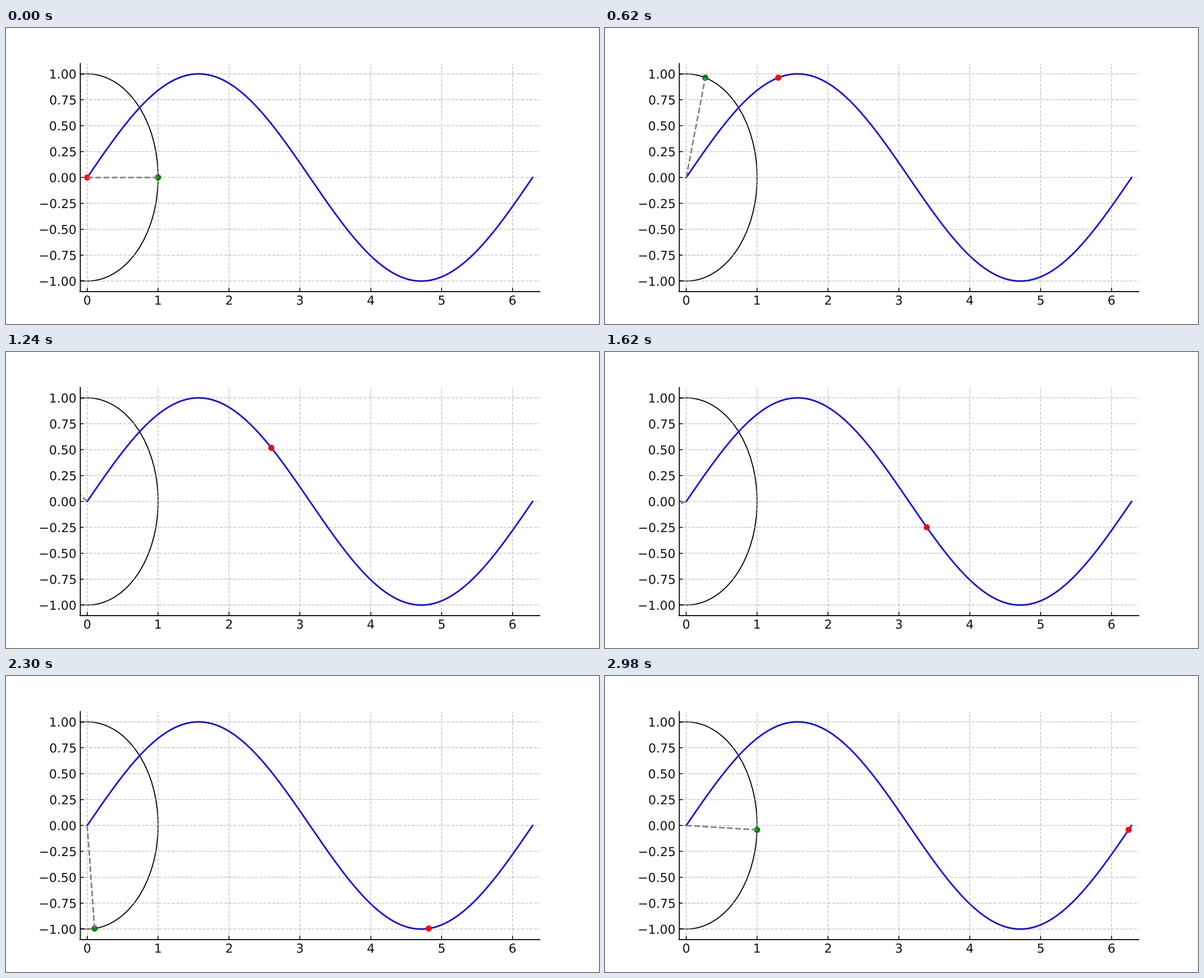
Write a matplotlib script that moves like this. It is 1058 by 529 pixels and loops after 3000 ms.

```python
import numpy as np
import matplotlib.pyplot as plt
from matplotlib.animation import FuncAnimation
from matplotlib.patches import PathPatch
from matplotlib.textpath import TextPath
from matplotlib.transforms import Affine2D

FRAMES = 150
INTERVAL = 20
TAU = 2 * np.pi
DPI = 132.25
PT = DPI / 72          # pixels in one point
W, H = 1058, 529
EM = 12 * PT           # label size in pixels

# Soft, unsnapped edges keep lines at their exact fractional positions
plt.rcParams["path.snap"] = False
plt.rcParams["font.family"] = "DejaVu Sans"

fig, ax = plt.subplots(figsize=(W / DPI, H / DPI), dpi=DPI)
ax.set_xlim(-0.1, TAU + 0.1)
ax.set_ylim(-1.1, 1.1)
ax.spines[["top", "right"]].set_visible(False)
ax.spines[["left", "bottom"]].set_linewidth(1)
ax.spines.left.set_position(("outward", -0.18))
ax.spines.bottom.set_position(("outward", 0.18))

xticks = np.arange(7)
yticks = np.linspace(-1, 1, 9)
ax.set_xticks(xticks)
ax.set_yticks(yticks)
ax.tick_params(length=0, labelleft=False, labelbottom=False)
ax.grid(True, linestyle="--", linewidth=0.8, color="#b0b0b0", alpha=0.7)

# Inward tick marks, 3.5 points long
box = ax.get_window_extent()
mark = dict(color="black", linewidth=0.8, zorder=2.1)
ax.vlines(xticks, 0, 3.5 * PT / box.height,
          transform=ax.get_xaxis_transform(), **mark)
ax.hlines(yticks, 0, 3.5 * PT / box.width,
          transform=ax.get_yaxis_transform(), **mark)


def label(text, x, base, align):
    """Place text by its ink, in pixels; align 0.5 centres, 1 sets the right edge."""
    path = TextPath((0, 0), text, size=EM)
    ink = path.get_extents()
    left = x - ink.x0 - align * ink.width
    fig.add_artist(PathPatch(path, color="#111111", linewidth=0,
                             transform=Affine2D().translate(left, base)))


for v in xticks:
    label(str(v), ax.transData.transform((v, 0))[0], H - 494.4, 0.5)
for v in yticks:
    y = ax.transData.transform((0, v))[1]
    label(f"{v:.2f}".replace("-", "\u2212"), box.x0 - 3.5 * PT - 0.066 * EM,
          y - 0.38 * EM, 1)

# Unit circle, stretched by the unequal axes
ax.add_patch(plt.Circle((0, 0), 1, fill=False, color="black", linewidth=1))

x = np.linspace(0, TAU, 400)
ax.plot(x, np.sin(x), color="blue", linewidth=1.5)
dots = ax.scatter([0, 1], [0, 0], s=36, c=["red", "green"], linewidths=0,
                  zorder=2)
radius, = ax.plot([], [], "--", color="gray", linewidth=1.5)


def update(i):
    t = TAU * i / FRAMES
    c, s = np.cos(t), np.sin(t)
    dots.set_offsets([(t, s), (c, s)])
    radius.set_data([0, c], [0, s])
    return dots, radius


anim = FuncAnimation(fig, update, frames=FRAMES, interval=INTERVAL,
                     init_func=lambda: update(0), repeat=True,
                     repeat_delay=0, blit=False)

plt.show()
```
